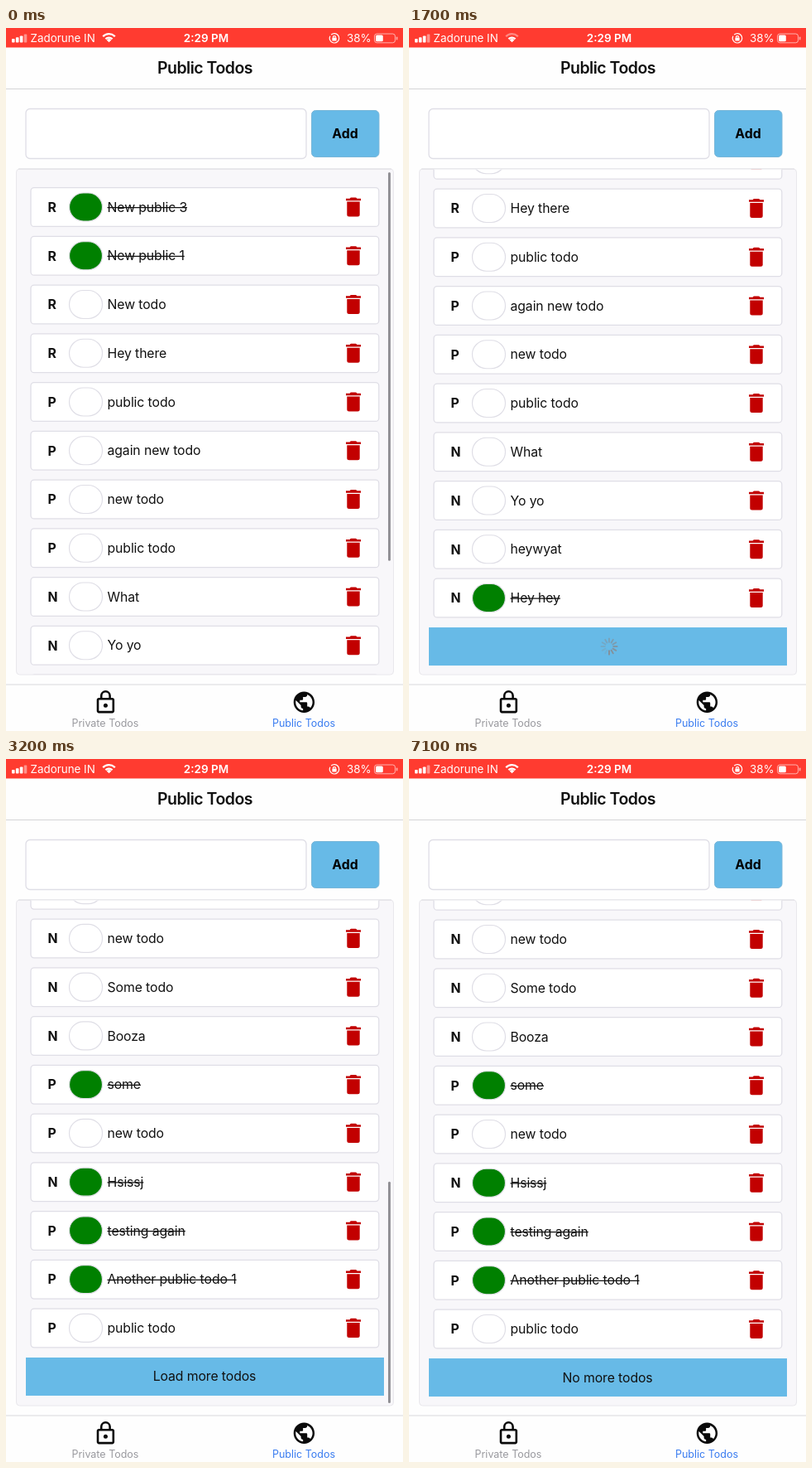
Recreate the animation shown at these times as an HTML page with a canvas. Size 480 px wide and 848 px high, loop 8.8 s.

```html
<!DOCTYPE html>
<html lang="en">
<head>
<meta charset="utf-8">
<title>Public Todos</title>
<style>
  html, body { margin: 0; width: 100%; height: 100%; overflow: hidden; background: #fff; }
  canvas { display: block; width: 480px; height: 848px; }
</style>
</head>
<body>
<canvas id="stage"></canvas>
<script>
const W = 480, H = 848, LOOP = 8800, STEP = 100;
const canvas = document.getElementById('stage');
const ratio = window.devicePixelRatio || 1;
canvas.width = W * ratio;
canvas.height = H * ratio;
const ctx = canvas.getContext('2d');

// Initial, label; a leading * marks a finished todo.
const todos = [
  'R *New public 3', 'R *New public 1', 'R New todo', 'R Hey there',
  'P public todo', 'P again new todo', 'P new todo', 'P public todo',
  'N What', 'N Yo yo', 'N heywyat', 'N *Hey hey',
  'N Somemoe', 'N new todo', 'N Some todo', 'N Booza', 'P *some',
  'P new todo', 'N *Hsissj', 'P *testing again', 'P *Another public todo 1',
  'P public todo'
].map(s => ({ initial: s[0], done: s[2] === '*', label: s.slice(2).replace('*', '') }));

const PAGE_1 = 12, PITCH = 58.75, FIRST = 216;
const LIST = { x: 12.5, y: 170, w: 456, h: 610 };
const END_1 = 174.75, END_2 = END_1 + PITCH * 10;
const LOADED = 2100, TAP_1 = 1500, TAP_2 = 4000, EMPTY = 5300;
const BLUE = '#67bae7', LINE = '#dfdee6';

const globe = new Path2D('M12 2C6.48 2 2 6.48 2 12s4.48 10 10 10 10-4.48 10-10S17.52 2 12 2z' +
  'm-1 17.93c-3.95-.49-7-3.85-7-7.93 0-.62.08-1.21.21-1.79L9 15v1c0 1.1.9 2 2 2z' +
  'm6.9-2.54c-.26-.81-1-1.39-1.9-1.39h-1v-3c0-.55-.45-1-1-1H8v-2h2c.55 0 1-.45 1-1V7h2' +
  'c1.1 0 2-.9 2-2v-.41c2.93 1.19 5 4.06 5 7.41 0 2.08-.8 3.97-2.1 5.39z');

const clamp = (v, a = 0, b = 1) => Math.min(b, Math.max(a, v));
const smooth = u => u * u * (3 - 2 * u);

function fling(t, start, peak, from, end, over, tau) {
  if (t < peak) return from + (end + over - from) * smooth(clamp((t - start) / (peak - start)));
  const rest = over * Math.exp(-(t - peak) / tau);
  return end + (rest < 0.4 ? 0 : rest);
}

function scrollAt(t) {
  return t < LOADED
    ? fling(t, 0, 450, 0, END_1, 21, 180)
    : fling(t, 2078, 2700, END_1, END_2, 20, 170);
}

function box(x, y, w, h, r, fill, stroke, width = 1.2) {
  ctx.beginPath();
  ctx.roundRect(x, y, w, h, r);
  if (fill) { ctx.fillStyle = fill; ctx.fill(); }
  if (stroke) { ctx.strokeStyle = stroke; ctx.lineWidth = width; ctx.stroke(); }
}

function text(s, x, y, size, { weight = 400, color = '#111', align = 'left', spacing = 0 } = {}) {
  ctx.font = `${weight} ${size}px Inter, Roboto, sans-serif`;
  ctx.letterSpacing = spacing + 'px';
  ctx.textAlign = align;
  ctx.fillStyle = color;
  ctx.fillText(s, x, y);
  return ctx.measureText(s).width;
}

function line(x1, y1, x2, y2, color, width = 1) {
  ctx.strokeStyle = color;
  ctx.lineWidth = width;
  ctx.beginPath();
  ctx.moveTo(x1, y1);
  ctx.lineTo(x2, y2);
  ctx.stroke();
}

function wifi(weak) {
  [[2, 4], [5.6, 2.2], [10, 2.2]].forEach(([r, width], i) => {
    ctx.strokeStyle = i === 2 && weak ? 'rgba(255,255,255,.4)' : '#fff';
    ctx.lineWidth = width;
    ctx.beginPath();
    ctx.arc(124.5, 17.2, r, -Math.PI * 0.76, -Math.PI * 0.24);
    ctx.stroke();
  });
}

function statusBar(t) {
  ctx.fillStyle = '#ff3b30';
  ctx.fillRect(0, 0, W, 23.5);
  for (let i = 0; i < 4; i++) {
    const h = 4.5 + i * 1.8;
    box(7 + i * 4.9, 17.5 - h, 3.6, h, 0.8, i < 3 ? '#fff' : 'rgba(255,255,255,.45)');
  }
  const white = { color: '#fff' };
  text('Zadorune IN', 29.5, 17.3, 13.4, white);
  wifi(t >= 1600 && t < LOADED || t >= 5400 && t < 7100);
  text('2:29 PM', 242, 17.3, 13.5, { ...white, weight: 600, align: 'center' });

  // Rotation lock
  ctx.strokeStyle = '#fff';
  ctx.lineWidth = 1.2;
  ctx.beginPath();
  ctx.arc(397, 12.3, 5.7, -2.3, 3.6);
  ctx.stroke();
  box(394.4, 11.6, 5.2, 4, 0.6, '#fff');
  ctx.beginPath();
  ctx.arc(397, 11.4, 1.7, Math.PI, 0);
  ctx.stroke();

  text('38%', 412, 17.3, 13.4, white);
  box(445.5, 7, 25, 10.8, 3, null, 'rgba(255,255,255,.6)', 1);
  box(447, 8.5, 8.8, 7.8, 1.5, '#fff');
  box(471.8, 10.5, 1.6, 4, 0.8, 'rgba(255,255,255,.6)');
}

function header() {
  text('Public Todos', 240.5, 55, 19.5, { weight: 600, align: 'center', spacing: -0.5 });
  line(0, 73.5, W, 73.5, '#d4d4d6');
  box(24, 97.5, 339, 60, 5, '#fff', LINE, 1.3);
  box(369.5, 99.5, 81.5, 56, 5, BLUE, '#78b6d8', 1);
  text('Add', 410, 133, 15.8, { weight: 700, color: '#000', align: 'center' });
}

function trash(x, y) {
  const red = '#c20000';
  box(x - 9, y - 10.3, 18, 2.5, 0, red);
  box(x - 4.3, y - 11.6, 8.6, 2, [1.5, 1.5, 0, 0], red);
  box(x - 7.7, y - 6.4, 15.4, 18, [0, 0, 2.5, 2.5], red);
}

function row({ initial, done, label }, y) {
  box(30, y - 23.4, 420.8, 46.8, 4, '#fff', LINE, 1.3);
  text(initial, 50.5, y + 5.8, 15.8, { weight: 700 });
  box(76.5, y - 17, 40, 34, 17, done ? '#008000' : '#fff', LINE);
  const w = text(label, 122.5, y + 5.7, 15.8, { spacing: -0.1 });
  if (done) line(122.5, y + 0.7, 122.5 + w, y + 0.7, '#111', 1.3);
  trash(420, y);
}

function spinner(x, y, ms) {
  const head = Math.floor(ms * 12 / 1000) + 4;
  ctx.lineCap = 'round';
  for (let i = 0; i < 12; i++) {
    const a = i * Math.PI / 6 - Math.PI / 2;
    const age = ((head - i) % 12 + 12) % 12;
    const c = Math.cos(a), s = Math.sin(a);
    line(x + c * 5.2, y + s * 5.2, x + c * 9.6, y + s * 9.6,
      `rgba(135,140,146,${0.95 - age * 0.068})`, 1.9);
  }
  ctx.lineCap = 'butt';
}

function moreButton(t, y) {
  ctx.fillStyle = BLUE;
  ctx.fillRect(24, y - 23, 433, 46);
  if (t >= TAP_1 && t < LOADED) spinner(242, y, Math.min(t, 1800) - TAP_1);
  else if (t >= TAP_2 && t < EMPTY) spinner(242, y, Math.min(t, 4900) - TAP_2);
  else text(t >= EMPTY ? 'No more todos' : 'Load more todos', 240, y + 5.5, 15.8,
    { align: 'center', spacing: -0.1 });
}

function scrollBar(t, pos, end) {
  const fade = t < LOADED ? 1100 : 3400;
  const alpha = 1 - clamp((t - fade) / 300);
  if (!alpha) return;
  const track = 603, size = LIST.h + end;
  const over = Math.max(0, pos - end);
  const len = track * LIST.h / size - over * 0.8;
  const top = over ? 174 + track - len : 174 + track * pos / size;
  ctx.globalAlpha = alpha;
  box(462, top, 3, len, 1.5, '#929196');
  ctx.globalAlpha = 1;
}

function list(t) {
  const pos = scrollAt(t);
  const full = t >= LOADED;
  const count = full ? todos.length : PAGE_1;
  box(LIST.x, LIST.y, LIST.w, LIST.h, 4, '#f8f7fa', '#e9e8ec', 1);
  line(15, LIST.y, 466, LIST.y, '#dddce1');
  ctx.save();
  ctx.beginPath();
  ctx.rect(13, LIST.y + 0.5, 455, LIST.h - 0.5);
  ctx.clip();
  for (let i = 0; i < count; i++) {
    const y = FIRST + i * PITCH - pos;
    if (y > 140 && y < 810) row(todos[i], y);
  }
  moreButton(t, FIRST + count * PITCH - pos - 0.2);
  scrollBar(t, pos, full ? END_2 : END_1);
  ctx.restore();
}

function tabBar() {
  line(0, 792, W, 792, '#d9d9dc');
  const ink = '#0a0a0a';
  box(111, 809.3, 18.8, 15.8, 1.5, null, ink, 2.6);
  ctx.beginPath();
  ctx.moveTo(115.2, 809);
  ctx.lineTo(115.2, 805.5);
  ctx.arc(120.4, 805.5, 5.2, Math.PI, 0);
  ctx.lineTo(125.6, 809);
  ctx.stroke();
  ctx.fillStyle = ink;
  ctx.beginPath();
  ctx.arc(120.4, 817.3, 2.5, 0, Math.PI * 2);
  ctx.fill();

  ctx.save();
  ctx.translate(360.4, 813.3);
  ctx.scale(1.27, 1.27);
  ctx.translate(-12, -12);
  ctx.fill(globe, 'evenodd');
  ctx.restore();

  text('Private Todos', 120, 843.3, 12.5, { color: '#9a9a9f', align: 'center' });
  text('Public Todos', 360, 843.3, 12.5, { color: '#3b7df0', align: 'center' });
}

function draw(now) {
  const t = Math.floor(now % LOOP / STEP) * STEP;
  ctx.setTransform(ratio, 0, 0, ratio, 0, 0);
  ctx.fillStyle = '#fefefe';
  ctx.fillRect(0, 0, W, H);
  statusBar(t);
  header();
  list(t);
  tabBar();
}

let start;
function tick(now) {
  start ??= now;
  draw(now - start);
  requestAnimationFrame(tick);
}
requestAnimationFrame(tick);
</script>
</body>
</html>
```
